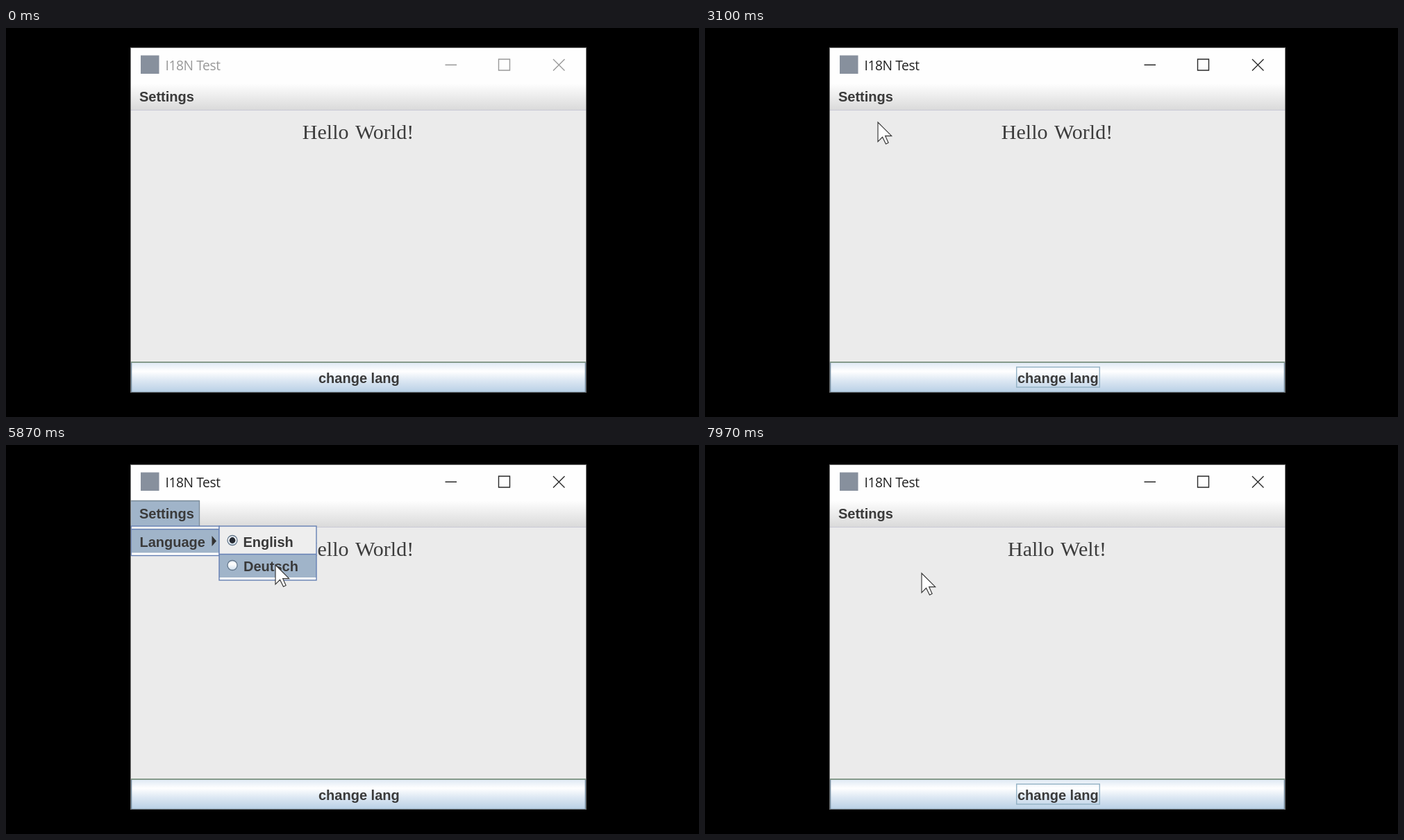
Animation, 998 px wide and 561 px high, one loop 8000 ms. Source, as an HTML page:

```html
<!DOCTYPE html>
<html lang="en">
<head>
<meta charset="utf-8">
<title>I18N Test</title>
<style>
  html, body { margin: 0; width: 100%; height: 100%; overflow: hidden; background: #000; }
  svg { display: block; width: 100%; height: 100%; }
  text { font: bold 20px "Liberation Sans", Arial, sans-serif; fill: #3a3a3a; }
  .title { font: 19.2px "Open Sans", sans-serif; letter-spacing: -.4px; }
  .greeting { font: 30px "Liberation Serif", "Times New Roman", serif; word-spacing: 2.5px; fill: #3c3c3c; text-anchor: middle; }
  .controls { fill: none; stroke-width: 1.4; }
  .selected { fill: #a0b4c9; }
  .edge { fill: none; stroke: #6680b4; stroke-width: 1.4; }
  .radio { fill: url(#radioFill); stroke: #65788c; stroke-width: 1.3; }
</style>
</head>
<body>
<svg viewBox="0 0 998 561">
  <defs>
    <linearGradient id="menuFill" x2="0" y2="1">
      <stop stop-color="#fefefe"/><stop offset="1" stop-color="#dadada"/>
    </linearGradient>
    <linearGradient id="buttonFill" x2="0" y2="1">
      <stop stop-color="#dde8f3"/><stop offset=".3" stop-color="#fff"/>
      <stop offset=".6" stop-color="#dde8f3"/><stop offset="1" stop-color="#b8cfe5"/>
    </linearGradient>
    <linearGradient id="radioFill" x2="0" y2="1">
      <stop stop-color="#e4edf6"/><stop offset=".35" stop-color="#fff"/><stop offset="1" stop-color="#cfdeec"/>
    </linearGradient>
    <clipPath id="windowClip"><rect x="179" y="28" width="657" height="498"/></clipPath>
  </defs>
  <rect width="998" height="561"/>

  <g clip-path="url(#windowClip)">
    <rect x="179" y="28" width="657" height="498" fill="#ebebeb"/>
    <rect x="179" y="28" width="657" height="52" fill="#fefefe"/>
    <rect x="194" y="39.5" width="26.5" height="26.5" fill="#87909d"/>
    <text id="title" class="title" x="229.5" y="61">I18N Test</text>
    <path id="controls" class="controls" d="M632.5 53.3h16.5M709.5 45h16v16h-16zM788 45l16.5 16.5M804.5 45l-16.5 16.5"/>

    <rect x="179" y="80" width="657" height="38" fill="url(#menuFill)"/>
    <path d="M179 118.5h657" stroke="#c9c9d6"/>
    <text id="greeting" class="greeting" x="507" y="160"></text>

    <rect id="button" x="180.5" y="482" width="654" height="43.5" stroke="#6f879a" stroke-width="1.5"/>
    <path id="buttonTop" d="M180 482h655" stroke="#83997f" stroke-width="1.6"/>
    <g id="buttonHover" fill="none">
      <rect x="181" y="482.5" width="653.5" height="43" stroke="#b4c8dc" stroke-width="3"/>
      <rect x="182.7" y="484" width="650.5" height="40" stroke="#7793b0" stroke-width="1.8"/>
    </g>
    <rect id="focus" x="448.7" y="489" width="119.6" height="29" fill="none" stroke="#93b2c5" stroke-width="1.4"/>
    <text x="450" y="512">change lang</text>

    <g id="settingsOpen">
      <rect class="selected" x="180" y="80" width="98.5" height="37"/>
      <path d="M180 80.5h98.5V117" fill="none" stroke="#7a8a99" stroke-width="1.3"/>
    </g>
    <text x="192" y="105.5">Settings</text>

    <g id="menu">
      <rect x="180" y="117" width="127" height="42.5" fill="#f4f4f4"/>
      <g id="languageRow">
        <rect class="selected" x="181" y="121.5" width="126" height="34"/>
        <path class="edge" d="M181 121.5h126"/>
      </g>
      <path d="M181 157h126" stroke="#fff" stroke-width="2.5"/>
      <rect class="edge" x="180.2" y="117" width="127" height="42.5"/>
      <text x="192.5" y="146.5">Language</text>
      <path d="M296.5 131l6.5 7.5l-6.5 7.5z" fill="#333"/>
    </g>

    <g id="submenu">
      <rect x="307" y="117" width="140" height="78" fill="#eee"/>
      <g id="englishRow">
        <rect class="selected" x="307" y="121.5" width="140" height="35"/>
        <path class="edge" d="M307 121.5h140"/>
      </g>
      <g id="deutschRow">
        <rect class="selected" x="307" y="157.5" width="140" height="33.5"/>
        <path class="edge" d="M307 157.5h140"/>
        <path d="M307 192.5h140" stroke="#fff" stroke-width="2.5"/>
      </g>
      <rect class="edge" x="307" y="117" width="140" height="78"/>
      <circle class="radio" cx="326" cy="137.5" r="7"/>
      <circle cx="326" cy="137.5" r="4.4" fill="#262b33"/>
      <circle class="radio" cx="326" cy="173.5" r="7"/>
      <text x="341.5" y="146.5">English</text>
      <text x="342" y="182">Deutsch</text>
    </g>

    <path id="cursor" d="M0 0V17L4 13L7 19L9.2 18L6.5 12H12Z" fill="#fff" stroke="#333" stroke-width=".7"/>
    <rect x="179.5" y="28.5" width="656" height="497" fill="none" stroke="#555" stroke-opacity=".75"/>
  </g>
</svg>
<script>
const DURATION = 8000;
const TIMES = { activate: 1200, enter: 2300, openMenu: 3700, openSubmenu: 4450, choose: 6030, press: 6940, release: 7030 };

// Cursor stops: time, x, y
const path = [
  [2300, 172, 300], [3100, 249, 136], [3530, 236, 98], [3900, 236, 98],
  [4400, 254, 128], [4970, 258, 127], [5220, 262, 132], [5520, 340, 140],
  [5870, 388, 173], [6060, 388, 173], [6570, 458, 483], [6840, 472, 502],
  [7120, 472, 502], [7970, 312, 185]
];

const el = Object.fromEntries([...document.querySelectorAll("svg [id]")].map(node => [node.id, node]));
const show = (node, visible) => node.setAttribute("visibility", visible ? "inherit" : "hidden");
const between = (value, from, to) => value >= from && value < to;

function cursorAt(time) {
  const next = path.findIndex(stop => stop[0] > time);
  if (next < 0) return path.at(-1).slice(1);
  if (next === 0) return path[0].slice(1);
  const [t0, x0, y0] = path[next - 1], [t1, x1, y1] = path[next];
  const u = (time - t0) / (t1 - t0), eased = u * u * (3 - 2 * u);
  return [x0 + (x1 - x0) * eased, y0 + (y1 - y0) * eased];
}

function render(time) {
  const [x, y] = cursorAt(time);
  const active = time >= TIMES.activate;
  const cursorVisible = time >= TIMES.enter;
  const menuOpen = between(time, TIMES.openMenu, TIMES.choose);
  const submenuOpen = between(time, TIMES.openSubmenu, TIMES.choose);
  const hovering = cursorVisible && y >= 481;
  const inSubmenu = submenuOpen && x >= 307;

  el.title.style.fill = active ? "#222" : "#999";
  el.controls.style.stroke = active ? "#2a2a2a" : "#999";
  el.greeting.textContent = time < TIMES.release ? "Hello World!" : "Hallo Welt!";
  el.button.setAttribute("fill", between(time, TIMES.press, TIMES.release) ? "#b8cfe5" : "url(#buttonFill)");

  show(el.buttonTop, !hovering);
  show(el.buttonHover, hovering);
  show(el.focus, active && !menuOpen);
  show(el.settingsOpen, menuOpen);
  show(el.menu, menuOpen);
  show(el.languageRow, menuOpen && (submenuOpen || y >= 121));
  show(el.submenu, submenuOpen);
  show(el.englishRow, inSubmenu && y < 157);
  show(el.deutschRow, inSubmenu && y >= 157);
  show(el.cursor, cursorVisible);
  el.cursor.setAttribute("transform", `translate(${x} ${y}) scale(1.64)`);
}

const start = performance.now();
function tick() {
  render((performance.now() - start) % DURATION);
  requestAnimationFrame(tick);
}
tick();
</script>
</body>
</html>
```
